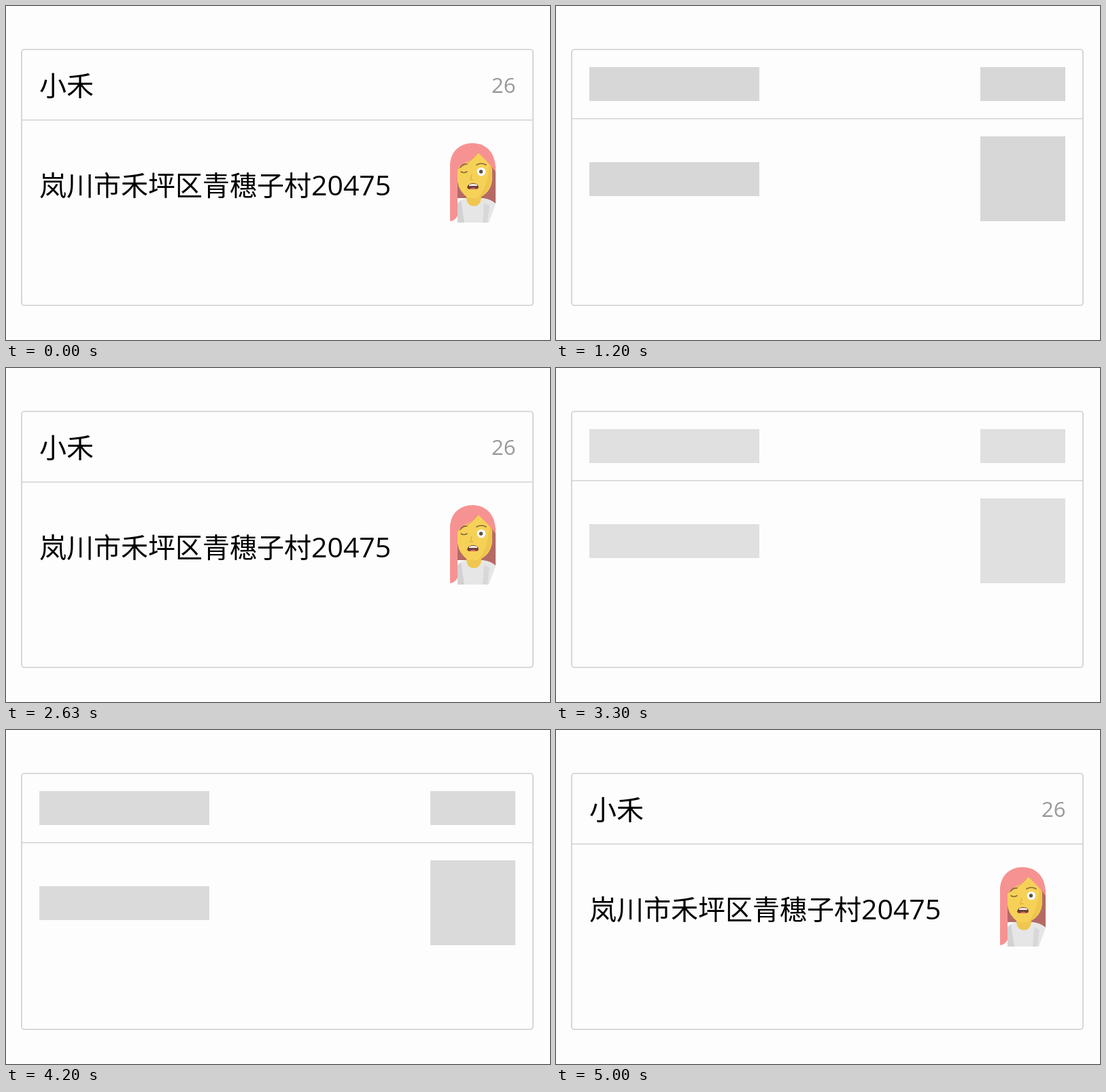
An HTML page for the animation above (5030 ms loop, 800 by 492 pixels).

```html
<!DOCTYPE html>
<html lang="zh-CN">
<head>
<meta charset="utf-8">
<title>Skeleton card</title>
<style>
  html, body { margin: 0; width: 100%; height: 100%; overflow: hidden; background: #fdfdfd; }
  svg { display: block; width: 800px; height: 492px; }
  .line { fill: none; stroke: #d0d0d0; stroke-width: 1.7; }
  .text { font: 40px "Noto Sans CJK SC", "Noto Sans CJK", sans-serif; fill: #000; }
  .num { font: 41px "Open Sans", "Noto Sans", sans-serif; }
  .age { font: 31px "Open Sans", "Noto Sans", sans-serif; fill: #999; text-anchor: end; }

  .content { animation: content 5030ms step-end infinite; }
  .skeleton { animation: skeleton 5030ms step-end infinite; }
  .blocks { animation: pulse 5030ms ease-in-out infinite; }

  /* two loads per loop, 1.5 s each */
  @keyframes content {
    0%, 40.36%, 92.64% { opacity: 1; }
    10.53%, 62.82% { opacity: 0; }
  }
  @keyframes skeleton {
    0%, 40.36%, 92.64% { opacity: 0; }
    10.53%, 62.82% { opacity: 1; }
  }
  @keyframes pulse {
    0%, 10.53%, 40.36%, 62.82%, 92.64%, 100% { fill: #e1e1e1; }
    25.45%, 77.73% { fill: #d7d7d7; }
  }
</style>
</head>
<body>
<svg viewBox="0 0 800 492">
  <rect class="line" x="23" y="64" width="752" height="377" rx="4"/>

  <g class="skeleton">
    <path class="line" d="M23 166H775"/>
    <g class="blocks">
      <rect x="49" y="90" width="250" height="50"/>
      <rect x="624" y="90" width="125" height="50"/>
      <rect x="49" y="230" width="250" height="50"/>
      <rect x="624" y="192" width="125" height="125"/>
    </g>
  </g>

  <g class="content">
    <path class="line" d="M23 168H775"/>
    <text class="text" x="49" y="132">小禾</text>
    <text class="age" x="749.5" y="128">26</text>
    <text class="text" x="49" y="278.5">岚川市禾坪区青穗子村<tspan class="num">20475</tspan></text>

    <g class="avatar">
      <!-- hair behind -->
      <path fill="#b56a66" d="M664 236H720V291Q712 284 700 283H664Z"/>
      <!-- body and neck -->
      <path fill="#e6e6e6" d="M664 290Q668 285 677 283H699Q713 284 720 292L710 319H664Z"/>
      <path fill="#d2d2d2" d="M664 291L669 286L674 319H664Z"/>
      <path fill="#d8d8d8" d="M703 290L711 294L708 319H701Z"/>
      <path fill="#efc650" d="M677 276H699V284Q697 295 688 295Q679 295 677 284Z"/>
      <!-- face -->
      <path fill="#f6d157" d="M664 238Q668 218 692 215Q712 222 715 240V256Q713 276 694 283H680Q666 274 664 258Z"/>
      <path fill="#eec64d" d="M711 232Q715 236 715 250Q714 273 694 283Q709 266 711 232Z"/>
      <!-- hair in front -->
      <path fill="#f79292" d="M653 236C653 214 668 202 686 202C706 202 720 216 720 240V244C715 237 707 228 694 216C686 229 671 230 664 240V309Q661 316 653 317Z"/>
      <path fill="none" stroke="#e58282" d="M694 216Q684 230 664 240"/>
      <!-- brows, wink, eye -->
      <g fill="none" stroke="#86693a" stroke-width="1.6" stroke-linecap="round">
        <path d="M668 238Q671 232 678 233M692 234Q699 230 706 234M669 244Q673 247 678 244"/>
      </g>
      <circle cx="699" cy="244" r="6.3" fill="#fafafa"/>
      <circle cx="698.5" cy="244" r="2.7" fill="#5d5144"/>
      <path fill="none" stroke="#dfb445" stroke-width="1.5" d="M685 248L683 256H687"/>
      <!-- mouth -->
      <path fill="#6e3f38" d="M678 268Q679 261 687 261Q695 261 695 268L692 270H681Z"/>
      <path fill="#f4f0ec" d="M681 263Q687 261 693 263V265H681Z"/>
      <path fill="#d96a62" d="M681 270Q687 265 693 270Z"/>
    </g>
  </g>
</svg>
</body>
</html>
```
